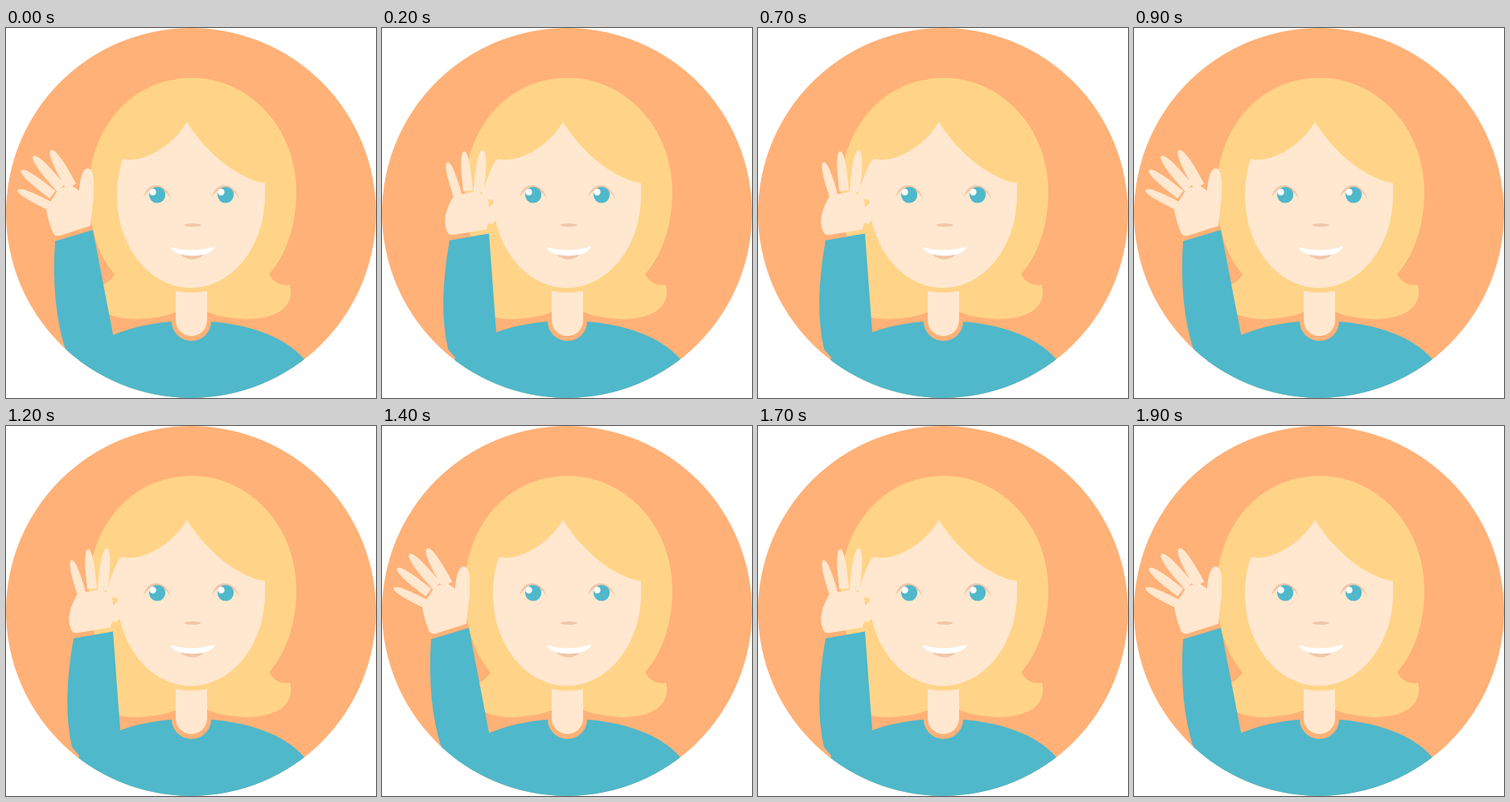
An HTML page with a canvas for the animation above (2 s loop, 460 by 460 pixels).

```html
<!DOCTYPE html>
<html lang="en">
<head>
<meta charset="utf-8">
<title>Waving woman</title>
<style>
  html, body { margin: 0; width: 100%; height: 100%; overflow: hidden; background: #fff; }
  canvas { display: block; width: 460px; height: 460px; }
</style>
</head>
<body>
<canvas id="stage" width="460" height="460"></canvas>
<script>
const ctx = document.getElementById('stage').getContext('2d');
const ORANGE = '#ffb177', HAIR = '#ffd488', SKIN = '#ffe8cf';
const TEAL = '#4fb8ca', BLUSH = '#f3c6aa', WHITE = '#fff';

const BEAT = 100, BEATS = 5;
const DEG = Math.PI / 180;
const WRIST = { x: 88, y: 262 };
const TURN = 46.5 * DEG;

const mix = (a, b, k) => a + (b - a) * k;
const shift = ([x, y], dx, dy) => [x + dx, y + dy];

// Where a point of the hand lands once turned about the wrist
function spin(x, y, a) {
  const dx = x - WRIST.x, dy = y - WRIST.y, c = Math.cos(a), s = Math.sin(a);
  return [WRIST.x + dx * c - dy * s, WRIST.y + dx * s + dy * c];
}

function fill(color, d) {
  ctx.fillStyle = color;
  ctx.fill(new Path2D(d));
}

function oval(color, x, y, rx, ry = rx) {
  ctx.fillStyle = color;
  ctx.beginPath();
  ctx.ellipse(x, y, rx, ry, 0, 0, Math.PI * 2);
  ctx.fill();
}

function drawHair() {
  fill(HAIR, `M231 62 C303 62 361 125 361 203 C361 248 347 284 327 306
    C333 317 344 322 353 319 C359 343 342 362 298 362 Q270 361 250 353
    H212 Q192 361 164 362 C120 362 103 343 109 319
    C118 322 129 317 135 306 C115 284 103 248 103 203 C103 126 155 62 231 62Z`);
}

function drawBody() {
  fill(TEAL, `M90 412 C114 383 161 368.5 206 365 A24.5 24 0 0 0 255 365
    C300 368.5 347 383 371 412 V460 H90Z`);
  fill(SKIN, 'M211 327 Q230.5 331 250 327 V363.5 A19.5 19.5 0 0 1 211 363.5Z');
}

function drawEye(x) {
  fill(BLUSH, `M${x - 17} 211 C${x - 14} 191 ${x + 12} 188 ${x + 18} 216
    C${x + 13} 197 ${x - 10} 195 ${x - 17} 211Z`);
  oval(TEAL, x, 207.5, 10.1);
  oval(WHITE, x - 5.5, 204, 4.2);
}

function drawFace() {
  fill(SKIN, `M225 117 C244 147 280 185 322 193 V208
    C322 272 281 323 230 323 C179 323 138 272 138 208
    Q138 184 145 163 C171 168 206 148 225 117Z`);
  drawEye(188);
  drawEye(273);
  oval(BLUSH, 232, 245, 10.5, 2);
  fill(BLUSH, 'M217 282 Q232 293.5 246 282Z');
  fill(WHITE, 'M204.5 272 C218 277.5 246 277.5 260 271 C258 287 208 287 204.5 272Z');
}

// A finger whose tip lies at the given angle and reach from the wrist
function drawFinger(angle, reach, lean, w) {
  const len = reach * 0.45;
  ctx.save();
  ctx.rotate(-angle * DEG);
  ctx.translate(0, -reach);
  ctx.rotate(-lean * DEG);
  fill(SKIN, `M0 0 C${w * 0.8} 0 ${w} ${len * 0.4} ${w} ${len * 0.7} V${len}
    H${-w} V${len * 0.7} C${-w} ${len * 0.4} ${-w * 0.8} 0 0 0Z`);
  ctx.restore();
}

function drawFingers(a) {
  ctx.save();
  ctx.translate(WRIST.x, WRIST.y);
  ctx.rotate(a);
  for (let i = 0; i < 4; i++) {
    drawFinger(50.5 - 11.4 * i, 116.5 - 4 * (i - 2.3) ** 2, 13, 5.5 + 0.5 * i);
  }
  drawFinger(-9, 88.5, 5, 9);
  ctx.restore();
}

function drawPalm(a, cuffL, cuffR) {
  const at = (x, y) => spin(x, y, a);
  fill(SKIN, `M${at(50, 224)} Q${shift(cuffL, -10, -30)} ${shift(cuffL, -4, -14)}
    Q${shift(cuffL, -2, -5)} ${shift(cuffL, 6, -7)} L${shift(cuffR, -3, -5)}
    Q${shift(cuffR, -2, -16)} ${at(109, 208)}
    L${at(92, 203)} L${at(82, 196)} L${at(66, 199)}Z`);
}

// k goes from 0, hand out, to 1, hand in
function drawArm(k) {
  const at = (x0, y0, x1, y1) => [mix(x0, x1, k), mix(y0, y1, k)];
  const cuffL = at(61, 265, 84, 264), cuffR = at(108, 251, 133, 255.5);
  const elbow = at(74, 400, 82, 399), pit = at(133, 381, 142, 377.5);
  drawFingers(TURN * k);
  drawPalm(TURN * k, cuffL, cuffR);
  fill(TEAL, `M${cuffL} Q${at(56, 345, 69.5, 345)} ${elbow}
    L${shift(elbow, 10, 12)} L110 440 L${pit} L${cuffR}Z`);
}

function draw(k) {
  ctx.clearRect(0, 0, 460, 460);
  oval(ORANGE, 230, 230, 230);
  ctx.save();
  ctx.clip();
  drawHair();
  drawBody();
  drawFace();
  drawArm(k);
  ctx.restore();
}

const start = performance.now();
function tick() {
  const beat = Math.floor((performance.now() - start) / BEAT) % BEATS;
  draw(Math.max(0, 1 - Math.abs(beat - 2) / 2));
  requestAnimationFrame(tick);
}
tick();
</script>
</body>
</html>
```
